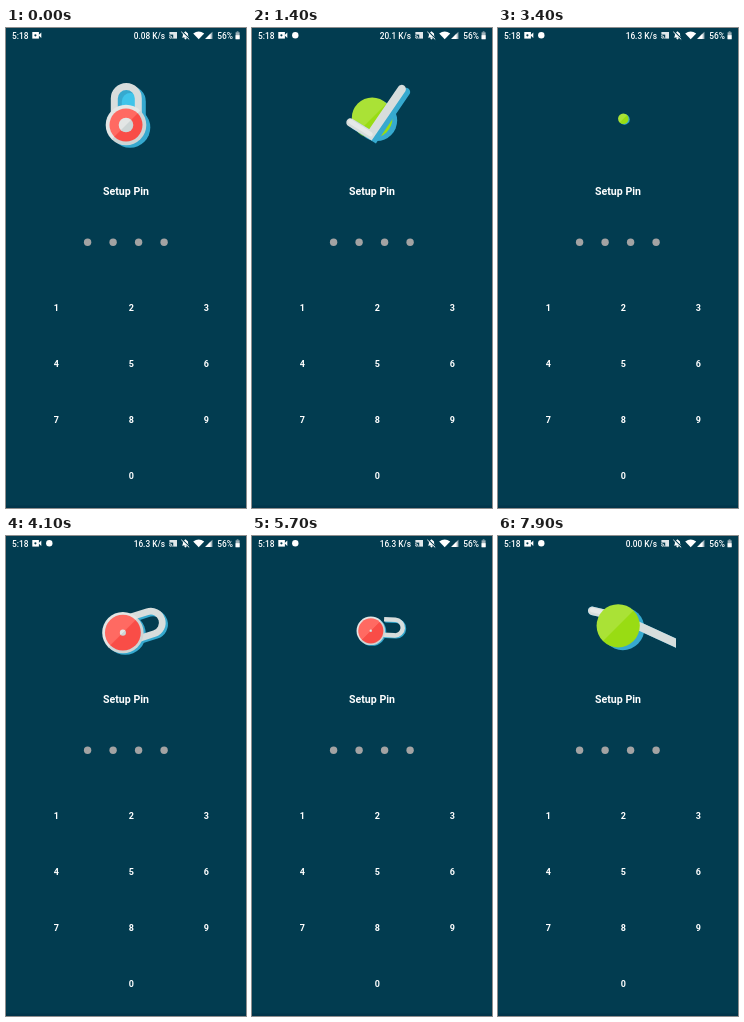
An HTML page with a canvas that plays this animation: 240x480 px, repeating every 8 s.

```html
<!DOCTYPE html>
<html lang="en">
<head>
<meta charset="utf-8">
<title>Setup Pin</title>
<style>
html, body { margin: 0; width: 100%; height: 100%; overflow: hidden; background: #023c50; }
canvas { display: block; width: 240px; height: 480px; }
</style>
</head>
<body>
<canvas id="stage"></canvas>
<script>
const LOOP = 8000, CYCLE = 5000, TAU = Math.PI * 2;
const BG = '#023c50', BLUE = '#36a9cf', CYAN = '#3fc4ea', GREY = ['#e3e6e5', '#cdd5d5'];
const RED = ['#ff6a62', '#f94d47'], GREEN = ['#aae236', '#99dc13'];
const PIVOT = [125, 91];

const canvas = document.getElementById('stage');
const ctx = canvas.getContext('2d');
const dpr = window.devicePixelRatio || 1;
canvas.width = 240 * dpr;
canvas.height = 480 * dpr;

const mix = (a, b, k) => a + (b - a) * k;
const span = (t, a, b) => Math.min(1, Math.max(0, (t - a) / (b - a)));
const cubeIn = k => k * k * k;
const cubeOut = k => 1 - (1 - k) ** 3;
const inOut = k => k < .5 ? 4 * k ** 3 : 1 - (2 - 2 * k) ** 3 / 2;
const expoOut = k => k >= 1 ? 1 : 1 - 2 ** (-10 * k);
const backOut = k => 1 + 1.9 * (k - 1) ** 3 + .9 * (k - 1) ** 2;

function text(str, x, y, size, weight, align) {
  ctx.font = `${weight} ${size}px Roboto, sans-serif`;
  ctx.textAlign = align;
  ctx.fillStyle = '#fff';
  ctx.fillText(str, x, y);
}

function disc(x, y, r, fill) {
  if (r <= 0) return;
  ctx.fillStyle = fill;
  ctx.beginPath();
  ctx.arc(x, y, r, 0, TAU);
  ctx.fill();
}

// Disc split by a diagonal into a light and a dark half
function splitDisc(x, y, r, [light, dark]) {
  if (r <= 0) return;
  const g = ctx.createLinearGradient(x - r, y - r, x + r, y + r);
  g.addColorStop(0, light);
  g.addColorStop(.49, light);
  g.addColorStop(.51, dark);
  g.addColorStop(1, dark);
  disc(x, y, r, g);
}

function poly(points, fill) {
  ctx.fillStyle = fill;
  ctx.beginPath();
  points.forEach(([x, y]) => ctx.lineTo(x, y));
  ctx.closePath();
  ctx.fill();
}

function line(points, color, width) {
  ctx.strokeStyle = color;
  ctx.lineWidth = width;
  ctx.beginPath();
  points.forEach(([x, y]) => ctx.lineTo(x, y));
  ctx.stroke();
}

function box(x, y, w, h, fill) {
  ctx.fillStyle = fill;
  ctx.fillRect(x, y, w, h);
}

function statusBar(t) {
  const speed = t < 400 ? '0.08' : t < 3400 ? '20.1' : t < 6400 ? '16.3' : '0.00';
  text('5:18', 6, 10.5, 8.4, 500, 'left');
  text(speed + ' K/s', 159, 10.5, 8.3, 500, 'right');
  text('56%', 211.3, 10.5, 8.4, 500, 'left');

  // camera
  box(26.3, 4, 6.6, 6.6, '#fff');
  poly([[32.5, 7.3], [35.3, 4.6], [35.3, 10]], '#fff');
  disc(29.4, 7.3, 1.1, BG);
  if (t >= 400) disc(43.3, 7.3, 3.2, '#fff');

  // cast
  box(163.4, 4, 7.6, 6.6, '#dfe7ea');
  box(163.2, 6.6, 4, 4.2, BG);
  ctx.strokeStyle = '#fff';
  ctx.lineWidth = .9;
  for (const r of [1.4, 3]) {
    ctx.beginPath();
    ctx.arc(163.2, 10.6, r, -Math.PI / 2, 0);
    ctx.stroke();
  }

  // muted bell
  poly([[175.8, 9.6], [176.8, 8.2], [177, 5.6], [179.4, 3.2], [182, 5.6], [182.2, 8.2], [183.2, 9.6]], '#fff');
  disc(179.5, 10.3, 1.1, '#fff');
  line([[176, 3.6], [183.8, 11]], BG, 1.4);
  line([[175.3, 3.8], [183.2, 11.4]], '#fff', 1);

  // wifi
  ctx.fillStyle = '#fff';
  ctx.beginPath();
  ctx.moveTo(192.7, 11.2);
  ctx.lineTo(187.2, 5.4);
  ctx.quadraticCurveTo(192.7, 1.4, 198.2, 5.4);
  ctx.fill();

  // signal
  poly([[199.2, 11], [206.4, 11], [206.4, 3.7]], '#a9bac1');
  poly([[199.2, 11], [204.6, 11], [204.6, 5.6]], '#fff');

  // battery
  box(230.7, 3.4, 1.8, 1, '#9fb1b9');
  box(229.6, 4.3, 4, 6.9, '#9fb1b9');
  box(229.6, 7.2, 4, 4, '#fff');
}

function keypad() {
  text('Setup Pin', 120, 167, 10.6, 700, 'center');
  for (let i = 0; i < 4; i++) disc(81.6 + i * 25.5, 214.2, 3.7, '#a3a3a3');
  for (let i = 0; i < 10; i++) {
    const col = i < 9 ? i % 3 : 1, row = Math.floor(i / 3);
    text((i + 1) % 10, 50.3 + col * 75, 283.2 + row * 56, 9, 700, 'center');
  }
  box(0, 477.5, 240, 2.5, '#01354a');
}

function shacklePath() {
  ctx.beginPath();
  ctx.moveTo(-12, 14);
  ctx.lineTo(-12, -3.5);
  ctx.arc(0, -3.5, 12, Math.PI, TAU);
  ctx.lineTo(12, 14);
}

// size: overall scale, open: 0 closed, 1 shackle turned to the side
function drawLock(size, open) {
  if (size <= 0) return;
  const at = (x, y) => [mix(PIVOT[0], x, size), mix(PIVOT[1], y, size)];
  const [sx, sy] = at(mix(120.3, 148.6, open), mix(74, 92.5, open));
  const [bx, by] = at(mix(120, 116, open), mix(97, 96.4, open));
  const depth = size * mix(1, .4, open);
  const shackle = (dx, dy, color, fill) => {
    const scale = size * mix(1, .92, open);
    ctx.save();
    ctx.translate(sx + dx * depth, sy + dy * depth);
    ctx.rotate(open * 1.7);
    ctx.scale(scale, scale);
    shacklePath();
    if (fill) {
      ctx.globalAlpha = Math.max(0, 1 - open * 2);
      ctx.fillStyle = color;
      ctx.fill();
    } else {
      ctx.lineWidth = 7;
      ctx.strokeStyle = color;
      ctx.stroke();
    }
    ctx.restore();
  };
  shackle(0, 0, CYAN, true);
  shackle(4, 3, BLUE);
  disc(bx + 4 * depth, by + 2.5 * depth, 20.3 * size, BLUE);
  shackle(0, 0, '#d8dddc');
  splitDisc(bx, by, 20.3 * size, GREY);
  splitDisc(bx, by, mix(16.5, 18, open) * size, RED);
  splitDisc(bx, by, mix(7.3, 1.5, open) * size, GREY);
}

// bend: 0 tick, 1 straight bar behind the disc; reach: arm length
function drawTick(bend, reach, slide) {
  if (reach <= 0) return;
  const cx = mix(118.3, 121, bend) - slide, cy = mix(108.3, 81, bend);
  const grow = mix(1, 1.18, bend) * reach;
  const arm = (deg, len) => {
    const a = deg * Math.PI / 180;
    return [cx + Math.cos(a) * len * grow, cy + Math.sin(a) * len * grow];
  };
  const points = [arm(mix(213, 193, bend), 23.3), [cx, cy], arm(mix(-60, 24.6, bend), 55)];
  const width = 8.4 * Math.min(1, reach * 2);
  const drop = 1 - bend;
  ctx.save();
  ctx.lineCap = 'round';
  ctx.lineJoin = 'miter';
  line(points.map(([x, y]) => [x + 4.5 * drop, y + 3 * drop]), BLUE, width);
  line(points, '#d7dddc', width);
  line(points.slice(0, 2).map(([x, y]) => [x, y - .8]), '#e6e9e8', width * .55);
  ctx.restore();
}

function drawDone(t) {
  const entering = t < 2000;
  const size = entering ? backOut(span(t, 1030, 1400)) : 1 - cubeIn(span(t, 2900, 3450));
  if (size <= 0) return;
  const bend = entering ? 1 - expoOut(span(t, 1100, 1800)) : inOut(span(t, 2500, 2900));
  const away = cubeIn(span(t, 2900, 3250));
  const reach = entering ? cubeOut(span(t, 1080, 1250)) : 1 - away;
  const x = mix(127, 120.2, size), y = mix(91, 89.8, size);
  const r = mix(20.3, 21.6, bend) * size;
  const tick = () => drawTick(bend, reach, away * 14);

  disc(x + 4.6 * size, y + 2.8 * size, r, BLUE);
  if (bend > .5) tick();
  splitDisc(x, y, r, GREEN);
  if (bend <= .5) tick();
}

function drawEmblem(t) {
  ctx.save();
  ctx.beginPath();
  ctx.rect(72, 40, 106, 100);
  ctx.clip();
  if (t < 1050) {
    drawLock(1 - cubeIn(span(t, 0, 1050)), inOut(span(t, 0, 900)));
  } else if (t < 3450) {
    drawDone(t);
  } else {
    drawLock(backOut(span(t, 3450, 4250)), 1 - inOut(span(t, 3600, 4850)));
  }
  ctx.restore();
}

function draw(t) {
  ctx.setTransform(dpr, 0, 0, dpr, 0, 0);
  box(0, 0, 240, 480, BG);
  statusBar(t);
  drawEmblem(t % CYCLE);
  keypad();
}

const start = performance.now();
function tick() {
  draw((performance.now() - start) % LOOP);
  requestAnimationFrame(tick);
}
tick();
</script>
</body>
</html>
```
